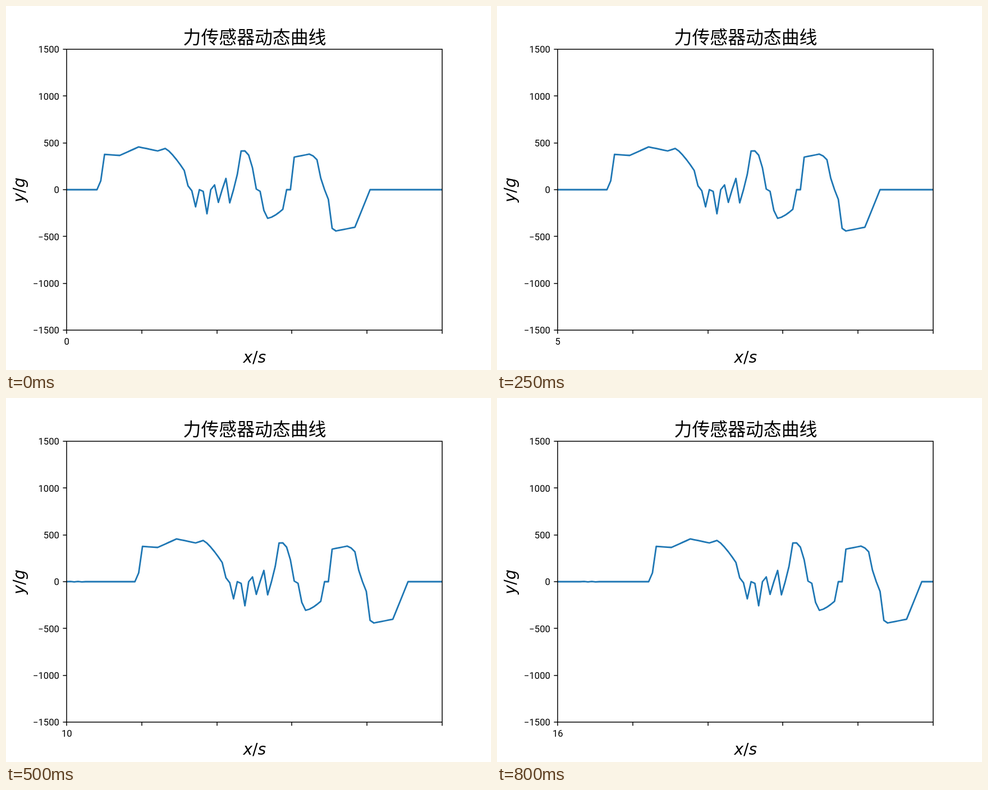
An HTML page for the animation above (0.85 s loop, 864 by 648 pixels).

```html
<!DOCTYPE html>
<html lang="zh-CN">
<head>
<meta charset="utf-8">
<title>力传感器动态曲线</title>
<style>
  html, body { margin: 0; width: 100%; height: 100%; overflow: hidden; background: #fff; }
  svg { display: block; width: 864px; height: 648px; }
  text { text-anchor: middle; }
  .title { font: 500 31.875px "Noto Sans CJK SC", "Noto Sans CJK", sans-serif; }
  .tick { font: 16.7px Roboto, "Liberation Sans", sans-serif; }
  .tick.y { text-anchor: end; }
  .axis { font: 28.125px "DejaVu Sans", sans-serif; }
  .axis tspan { font-style: oblique; }
  #frame { fill: none; stroke: #000; stroke-width: 1.5; }
  #curve { fill: none; stroke: #1f77b4; stroke-width: 2.8; stroke-linejoin: round; stroke-linecap: square; }
</style>
</head>
<body>
<svg viewBox="0 0 864 648">
  <clipPath id="plot"><rect x="108" y="77" width="669" height="500"/></clipPath>
  <g clip-path="url(#plot)"><polyline id="curve"/></g>
  <path id="frame"/>
  <g id="labels"></g>
  <text id="start" class="tick" x="108.3" y="602.5">0</text>
  <text class="title" x="443" y="67">力传感器动态曲线</text>
  <text class="axis" x="442.8" y="635"><tspan>x</tspan>/<tspan>s</tspan></text>
  <text class="axis" transform="translate(33.2 327.5) rotate(-90)"><tspan>y</tspan>/<tspan>g</tspan></text>
</svg>
<script>
const LEFT = 108, TOP = 77, WIDTH = 669, HEIGHT = 500, LIMIT = 1500;
const SAMPLES = 100, STEP = 50, STEPS = 17;

// Key points of the force: [sample, grams, bend of the way there]
const keys = [
  [8, 0], [10, 377, 2], [14, 366], [19, 457], [24, 414], [26, 440], [31, 206, 1.3], [33, -11, 0.4],
  [44, 0], [46, 413, 1.33], [47, 414], [50, 7, 2],
  [51, -17], [53, -306, 0.5], [57, -209, 1.5], [58, 0],
  [59, 0], [60, 348], [64, 380], [66, 320, 1.6],
  [68, 0, 0.7], [70, -413, 2], [71, -441], [76, -401], [80, 0]
];

const el = id => document.getElementById(id);
const yOf = g => TOP + HEIGHT / 2 * (1 - g / LIMIT);

// Chatter with a dip on every third sample and growing crests
function chatter(n) {
  const k = Math.floor(n / 3);
  return [-183 - 78 * Math.sin(1.9 * k), 0, 69 * k - 18][n % 3];
}

function force(i) {
  if (i >= -9 && i < -5) return -2 * Math.cos(Math.PI * i);
  if (i > 33 && i < 44) return chatter(i - 34);
  const n = keys.findIndex(key => key[0] >= i);
  if (n < 1) return 0;
  const [i0, g0] = keys[n - 1], [i1, g1, bend = 1] = keys[n];
  return g0 + (g1 - g0) * ((i - i0) / (i1 - i0)) ** bend;
}

function drawAxes() {
  let path = `M${LEFT} ${TOP}h${WIDTH}v${HEIGHT}h${-WIDTH}Z`, labels = "";
  for (let i = 0; i <= 5; i++) {
    path += `M${Math.round(LEFT + WIDTH * i / 5)} ${TOP + HEIGHT}v6.6`;
  }
  for (let g = -LIMIT; g <= LIMIT; g += 500) {
    const y = yOf(g);
    path += `M${LEFT} ${Math.round(y)}h-6.6`;
    labels += `<text class="tick y" x="95" y="${(y + 6.4).toFixed(2)}">${String(g).replace("-", "−")}</text>`;
  }
  el("frame").setAttribute("d", path);
  el("labels").innerHTML = labels;
}

function drawCurve(shift) {
  const points = [];
  for (let i = 0; i < SAMPLES; i++) {
    const x = LEFT + WIDTH * i / (SAMPLES - 1);
    points.push(`${x.toFixed(2)},${yOf(force(i - shift)).toFixed(2)}`);
  }
  el("curve").setAttribute("points", points.join(" "));
  el("start").textContent = shift;
}

let shown = -1;
function tick() {
  const shift = Math.floor(performance.now() / STEP) % STEPS;
  if (shift !== shown) drawCurve(shown = shift);
  requestAnimationFrame(tick);
}

drawAxes();
tick();
</script>
</body>
</html>
```
